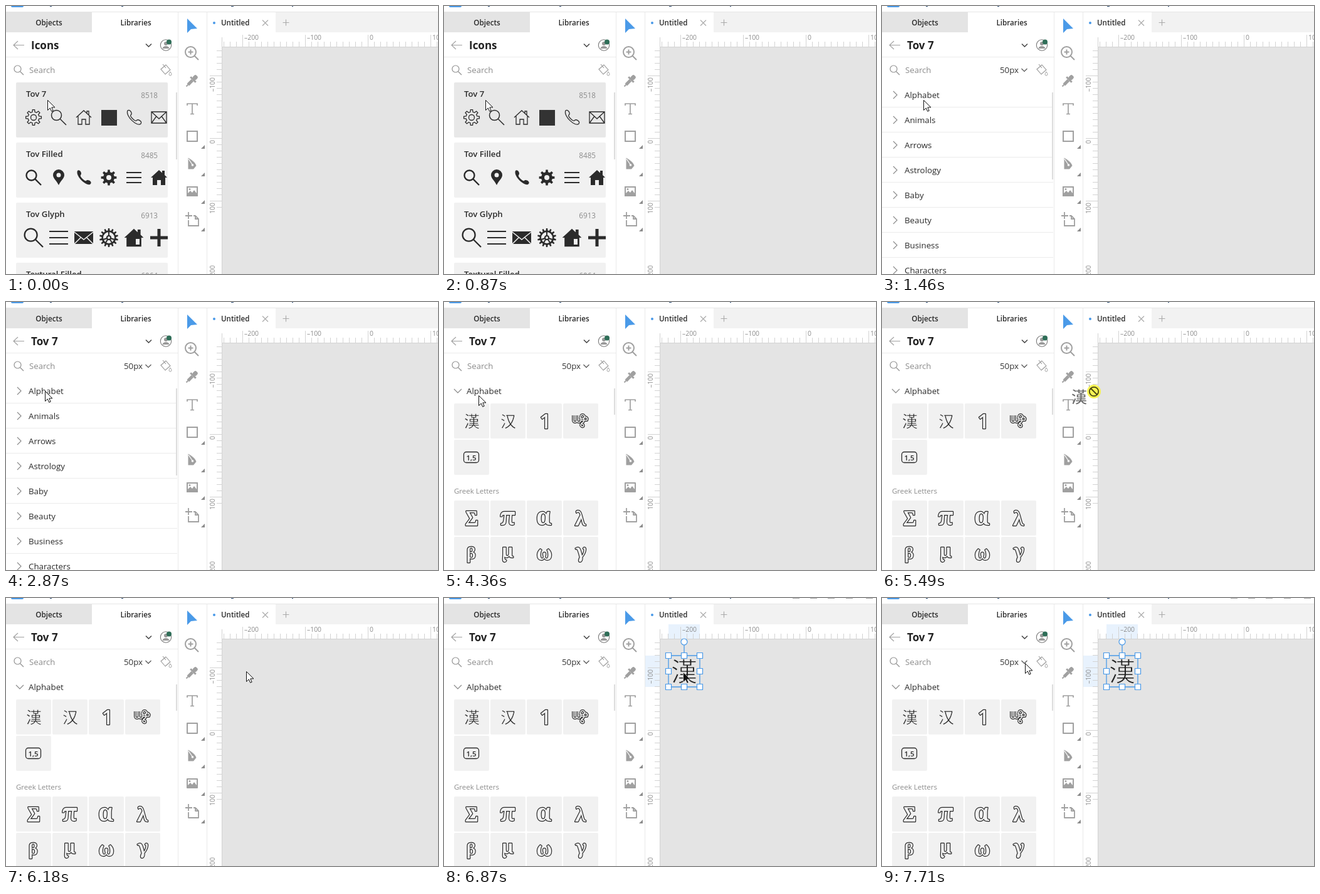
Recreate the animation shown at these times as an HTML page with a canvas. Size 689 by 428 pixels, loop 7.99 s.

```html
<!DOCTYPE html>
<html lang="en">
<head>
<meta charset="utf-8">
<title>Icon library drag and drop</title>
<style>
html, body { margin: 0; width: 100%; height: 100%; overflow: hidden; background: #fff; }
canvas { display: block; width: 689px; height: 428px; }
</style>
</head>
<body>
<canvas id="stage" width="689" height="428"></canvas>
<script>
const ctx = document.getElementById('stage').getContext('2d');
const LOOP = 7990;
const INK = '#2b2b2b', GREY = '#8c8c8c', TOOL = '#a0a0a0', BLUE = '#4a9ae8';
const TILE = '#f1f1f1', BOARD = '#e4e4e4';
const SANS = '"Open Sans", "Noto Sans", sans-serif';
const SERIF = '"Noto Serif", "DejaVu Serif", serif';
const CJK = '"Noto Sans CJK SC", "Noto Sans CJK JP", "Noto Sans CJK", sans-serif';

// Times of the hard changes
const T = { press: 640, full: 720, release: 870, open: 1460, press2: 2320, release2: 2500,
  expand: 3940, icons: 4120, grab: 4930, drop: 6180, place: 6410 };

// Pointer path: time, x, y
const PATH = [
  [0, 66, 150], [1885, 66, 150], [2130, 63, 143], [2845, 63, 143], [2870, 62, 142],
  [4230, 62, 142], [4360, 55, 149], [4560, 44, 168], [4750, 39, 188], [4890, 39, 188],
  [5000, 55, 206], [5100, 85, 218], [5200, 130, 206], [5290, 185, 185], [5370, 250, 163],
  [5450, 310, 149], [5490, 338, 143], [5600, 372, 122], [5720, 383, 117], [6830, 383, 117],
  [6870, 381, 118], [7030, 345, 126], [7250, 240, 132], [7380, 198, 122], [7500, 215, 109],
  [7580, 229, 105], [7685, 229, 105], [7710, 228, 104], [7990, 228, 104]
];

function slope(i, k) {
  return (PATH[i + 1][k] - PATH[i][k]) / (PATH[i + 1][0] - PATH[i][0]);
}

// Monotone tangent, so holds stay still
function tangent(i, k) {
  if (i === 0 || i === PATH.length - 1) return 0;
  const a = slope(i - 1, k), b = slope(i, k);
  return a * b <= 0 ? 0 : 2 * a * b / (a + b);
}

function pointer(t) {
  let i = 0;
  while (i < PATH.length - 2 && t >= PATH[i + 1][0]) i++;
  const h = PATH[i + 1][0] - PATH[i][0], u = (t - PATH[i][0]) / h;
  const at = k => {
    const p = PATH[i][k], q = PATH[i + 1][k];
    return Math.round(p + (q - p) * u * u * (3 - 2 * u)
      + h * u * (1 - u) * ((1 - u) * tangent(i, k) - u * tangent(i + 1, k)));
  };
  return [at(1), at(2)];
}

function rect(x, y, w, h, color, r = 0) {
  ctx.fillStyle = color;
  ctx.beginPath();
  ctx.roundRect(x, y, w, h, r);
  ctx.fill();
}

function text(s, x, y, size, color = INK, weight = 400, align = 'left') {
  ctx.font = `${weight} ${size}px ${SANS}`;
  ctx.textAlign = align;
  ctx.fillStyle = color;
  ctx.fillText(s, x, y);
}

function at(x, y, draw, scale = 1) {
  ctx.save();
  ctx.translate(x, y);
  ctx.scale(scale, scale);
  draw();
  ctx.restore();
}

function stroke(d, x, y, color = INK, width = 1.3, scale = 1) {
  at(x, y, () => {
    ctx.strokeStyle = color;
    ctx.lineWidth = width / scale;
    ctx.stroke(new Path2D(d));
  }, scale);
}

function fill(d, x, y, color = INK, scale = 1) {
  at(x, y, () => {
    ctx.fillStyle = color;
    ctx.fill(new Path2D(d), 'evenodd');
  }, scale);
}

const ring = (r, cx = 0, cy = 0) =>
  `M${cx + r} ${cy}A${r} ${r} 0 1 0 ${cx - r} ${cy}A${r} ${r} 0 1 0 ${cx + r} ${cy}Z`;

function gear(n, inner, outer) {
  let d = '';
  for (let i = 0; i < n; i++) {
    [[-.29, inner], [-.17, outer], [.17, outer], [.29, inner]].forEach(([o, r]) => {
      const a = (i + o) * 2 * Math.PI / n;
      d += `${d ? 'L' : 'M'}${(r * Math.sin(a)).toFixed(2)} ${(-r * Math.cos(a)).toFixed(2)}`;
    });
  }
  return d + 'Z';
}

const D = {
  lens: ring(8, -3.5, -3.5) + 'M2.2 2.2L12 12',
  home: 'M-12 0L0-11L12 0M-9-2V11H-3V3H3V11H9V-2M5-7V-10H8V-4',
  house: 'M0-12L5-7.5V-11H9V-4L13 0H10V12H-10V0H-13Z',
  phone: 'M-10-11C-6-14-2-6-5-4C-7-2 2 7 4 5C6 2 14 6 11 10C6 16-14-2-10-11Z',
  mail: 'M-12-9H12V9H-12ZM-12-9L0 2L12-9M-12 9L-4-2M12 9L4-2',
  pin: 'M0 12C-4 4-9 1-9-4A9 9 0 0 1 9-4C9 1 4 4 0 12Z' + ring(3.5, 0, -4),
  lines: 'M-12-8H12M-12 0H12M-12 8H12',
  script: 'M-11-8V0C-11 4-5 4-5 0V-8M-5 0C-5 4 1 4 1 0V-6C1-10 7-10 7-6S1-1 0-5' +
    'M1 0H11C13-4 9-7 6-4V2C2 4-1 8 3 10S6 4 2 6',
  down: 'M-4.5-2L0 2.5L4.5-2',
  right: 'M-3-6L3 0L-3 6',
  arrow: 'M.5.5V16.5L4.3 12.9L6.7 18.3L9.2 17.2L6.8 11.9H12Z'
};

function titleBar(selected) {
  rect(8, 0, 20, 2, BLUE, [0, 0, 3, 3]);
  [[70, 3], [184, 3], [359, 4], [456, 2]].forEach(([x, w]) => rect(x, 0, w, 1, '#2b4a70'));
  if (selected) [556, 584, 612, 641, 673].forEach(x => rect(x, 0, 11, 1, '#a5a5a5'));
}

function header(t) {
  rect(0, 10, 137, 32, BOARD);
  text('Objects', 68.5, 31, 11.7, INK, 600, 'center');
  text('Libraries', 207, 31, 11.7, INK, 600, 'center');
  stroke('M17 0H0M7-6.5L0 0L7 6.5', 12, 62.5, '#a0a0a0', 1.1);
  text(t < T.open ? 'Icons' : 'Tov 7', 40, 69, 17, '#222', 700);
  stroke(D.down, 227.5, 62.5, '#444', 1.5);
  stroke(ring(8.7), 255, 62.5, '#777', 1.1);
  fill(ring(3, 0, -2.5) + 'M-5.5 5.5C-5 0 5 0 5.5 5.5Z', 255, 62.5, '#999');
  fill(ring(4), 260, 57.5, '#2f6e58');
  rect(0, 81, 274, 1, '#ececec');
  stroke(ring(5.5, -1.5, -1.5) + 'M2.5 2.5L8 8', 20, 102, '#909090', 1.2);
  text('Search', 37, 107, 13.2, GREY);
  if (t >= T.open) {
    text('50px', 188, 107, 13.3, '#333');
    stroke(D.down, 227, 102, '#555', 1.2);
  }
  stroke('M-7 0L1-7L8 1L0 8ZM-4-8L1-2', 254, 101, '#999', 1.1);
  stroke('M0-3C-3 1-2 3 0 3S3 1 0-3Z', 262, 108, '#999', 1);
  rect(274, 10, 1, 418, '#e9e9e9');
}

function mailFilled(x, y) {
  rect(x - 15, y - 10, 30, 20, INK);
  stroke('M-15-9L0 3L15-9M-15 10L-5 0M15 10L5 0', x, y, TILE, 1.5);
}

function libraryList() {
  ctx.save();
  ctx.beginPath();
  ctx.rect(16, 122, 242, 306);
  ctx.clip();
  [['Tov 7', 8518], ['Tov Filled', 8485], ['Tov Glyph', 6913], ['Textural Filled', 6064]].forEach(([name, count], i) => {
    const y = 122 + 96 * i;
    rect(16, y, 242, 88, i ? TILE : '#e8e8e8', 2);
    text(name, 32, y + 23, 13.2, INK, 600);
    text(count, 242, y + 25, 11.7, GREY, 400, 'right');
  });
  stroke(gear(8, 9, 12.5) + ring(4.5), 44, 178);
  stroke(D.lens, 84, 178, INK, 1.5);
  stroke(D.home, 124, 178);
  rect(152, 166, 25, 25, '#333');
  stroke(D.phone, 204, 178);
  stroke(D.mail, 244, 178);

  stroke(D.lens, 44, 274, INK, 2.4);
  fill(D.pin, 84, 274);
  fill(D.phone, 124, 274);
  fill(gear(8, 9, 12.5) + ring(4), 164, 274);
  stroke(D.lines, 204, 274, INK, 2);
  fill(D.house, 244, 274);
  rect(241, 278, 6, 8, TILE);

  stroke(D.lens, 44, 370, INK, 2.3, 1.25);
  stroke(D.lines, 84, 370, INK, 2, 1.25);
  mailFilled(124, 370);
  fill(gear(14, 11.5, 15) + ring(9), 164, 370);
  stroke(ring(3) + 'M0-9V-3M-9 3L-3 1M9 3L3 1M-5 8L-2 3M5 8L2 3', 164, 370, INK, 2);
  fill(D.house, 204, 370, INK, 1.18);
  rect(207, 372, 6, 9, TILE);
  stroke('M-14 0H14M0-14V14', 244, 370, INK, 5);
  ctx.restore();
  rect(271, 138, 2, 107, '#dcdcdc');
}

function categories() {
  ['Alphabet', 'Animals', 'Arrows', 'Astrology', 'Baby', 'Beauty', 'Business', 'Characters'].forEach((name, i) => {
    const y = 142 + 40 * i;
    stroke(D.right, 21, y, GREY, 1.2);
    text(name, 36, y + 5, 13.3);
    rect(0, y + 19, 273, 1, '#ebebeb');
  });
  rect(271, 138, 2, 139, '#dcdcdc');
}

// A backdrop colour trims the strokes to a lighter weight
function glyph(s, x, y, size, backdrop) {
  ctx.font = `300 ${size}px ${CJK}`;
  ctx.textAlign = 'center';
  ctx.fillStyle = '#222';
  ctx.fillText(s, x, y + size * .38);
  if (!backdrop) return;
  ctx.strokeStyle = backdrop;
  ctx.lineWidth = size * .024;
  ctx.strokeText(s, x, y + size * .38);
}

// Outlined letter, centred and sized to a square icon box
function hollow(s, x, y, family) {
  const box = 23.5, font = size => `600 ${size}px ${family}`;
  const measure = () => {
    const m = ctx.measureText(s);
    return { l: m.actualBoundingBoxLeft, r: m.actualBoundingBoxRight,
      a: m.actualBoundingBoxAscent, d: m.actualBoundingBoxDescent };
  };
  ctx.textAlign = 'left';
  ctx.font = font(40);
  let m = measure();
  ctx.font = font(40 * box / Math.max(m.l + m.r, m.a + m.d));
  m = measure();
  const left = x + (m.l - m.r) / 2, base = y + (m.a - m.d) / 2;
  ctx.lineJoin = 'round';
  ctx.strokeStyle = INK;
  ctx.lineWidth = 2.4;
  ctx.strokeText(s, left, base);
  ctx.fillStyle = TILE;
  ctx.fillText(s, left, base);
}

function alphabet(t) {
  stroke('M-6-3L0 3L6-3', 22, 142, GREY, 1.2);
  text('Alphabet', 36, 147, 13.3);
  text('Greek Letters', 16, 306, 11.5, GREY);
  [162, 220, 317, 375].forEach((y, row) => {
    for (let col = 0; col < (row === 1 ? 1 : 4); col++) rect(16 + 58 * col, y, 56, 56, TILE, 2);
  });
  rect(271, 138, 2, 42, '#dcdcdc');
  if (t < T.icons) return;
  glyph('漢', 44.5, 190, 25, TILE);
  glyph('汉', 102.5, 190, 25, TILE);
  hollow('1', 160, 190, SANS);
  stroke(D.script, 217, 189, INK, 4);
  stroke(D.script, 217, 189, TILE, 1.6);
  ctx.strokeStyle = INK;
  ctx.lineWidth = 1.3;
  ctx.beginPath();
  ctx.roundRect(31.5, 239.5, 24, 17, 4);
  ctx.stroke();
  text('1,5', 43.5, 252.5, 11.5, INK, 600, 'center');
  [...'Σπαλβμωγ'].forEach((s, i) => hollow(s, 44 + 58 * (i % 4), i < 4 ? 345 : 403, SERIF));
}

function toolbar() {
  rect(320, 10, 1, 418, '#e9e9e9');
  fill('M0 0V23L6 17L16 16Z', 289, 20, BLUE);
  stroke(ring(8.5, -1.5, -1.5) + 'M5 5L11 11M-5.5-1.5H2.5M-1.5-5.5V2.5', 296, 75, TOOL, 2);
  at(296, 120, () => {
    ctx.rotate(Math.PI / 4);
    rect(-3.5, -12, 7, 8, TOOL, 3);
    rect(-6, -5, 12, 3, TOOL);
    rect(-2.5, -2, 5, 10, TOOL);
    rect(-1, 8, 2, 4, TOOL);
  });
  stroke('M-8-5V-8H8V-5M0-8V8.5M-3 8.5H3', 297, 164, TOOL, 1.7);
  stroke('M-8-8H8V8H-8Z', 297, 208, TOOL, 2);
  fill('M-6.5-9.5C0-6 5-2 6.5 3L2 8.5H-6.5Z', 297, 252, TOOL);
  stroke('M-6-8L0 1', 297, 252, '#fff', 1.2);
  fill(ring(1.8), 297.5, 254, '#fff');
  stroke('M-8-7H8V7H-8Z', 297, 296, TOOL, 2);
  fill('M-7 6V3L-3-1L0 2L3-2L7 3V6Z' + ring(1.5, -4, -3.5), 297, 296, TOOL);
  stroke('M-11-6H0M-6-12V-1M-6 1V10H10V-1L5-6H2M5-6V-1H10', 297, 341, TOOL, 1.8);
  [228, 272, 316, 360].forEach(y => fill('M0 0V-6L-6 0Z', 317, y, GREY));
}

function workspace(selected) {
  rect(321, 10, 368, 32, '#f2f2f2');
  rect(321, 10, 109, 32, '#fff');
  fill(ring(2), 332, 27, BLUE);
  text('Untitled', 343, 31, 11.6, INK, 600);
  stroke('M-4.5-4.5L4.5 4.5M4.5-4.5L-4.5 4.5', 413.5, 27, '#aaa', 1.1);
  stroke('M-5 0H5M0-5V5', 446.5, 26.5, '#aaa', 1.1);
  rect(345, 66, 344, 362, BOARD);
  if (selected) {
    rect(358, 42, 50, 24, '#e8f2fd');
    rect(321, 92, 24, 50, '#e8f2fd');
  }
  const tick = '#d3d3d3';
  rect(345, 65, 344, 1, tick);
  rect(344, 50, 1, 378, tick);
  for (let v = -230; v <= 110; v += 10) {
    const major = v % 100 === 0;
    const x = 577 + v, y = 211 + v;
    if (x > 346) rect(x, major ? 46 : 57, 1, major ? 20 : 9, tick);
    if (y > 66) rect(major ? 325 : 336, y, major ? 20 : 9, 1, tick);
  }
  [-200, -100, 0, 100, 200].forEach(v => {
    const label = (v < 0 ? '–' : '') + Math.abs(v);
    text(label, 580 + v, 54, 10.4, GREY);
    if (v > -200) at(333, 214 + v, () => {
      ctx.rotate(-Math.PI / 2);
      text(label, 0, 0, 10.4, GREY, 400, 'right');
    });
  });
}

function selection() {
  glyph('漢', 383, 117, 42, BOARD);
  stroke('M0-22V0M-25 0H25V50H-25Z', 383, 92, BLUE, 1.3);
  const knob = d => (x, y) => { fill(d, x, y, '#fff'); stroke(d, x, y, BLUE, 1.2); };
  knob(ring(5))(383, 70);
  const square = knob('M-4.5-4.5H4.5V4.5H-4.5Z');
  for (const x of [358, 383, 408])
    for (const y of [92, 117, 142]) if (x !== 383 || y !== 117) square(x, y);
}

function arrow(x, y, dark) {
  fill(D.arrow, x, y, dark ? '#111' : '#fff');
  stroke(D.arrow, x, y, dark ? '#fff' : '#111', dark ? .6 : 1);
}

function cursor(t) {
  const [x, y] = pointer(t);
  const dragging = t >= T.grab + 70 && t < T.drop;
  if (dragging) {
    const [gx, gy] = pointer(t - 41);
    ctx.globalAlpha = .7;
    glyph('漢', gx + 4.5, gy + 2, 25);
    ctx.globalAlpha = 1;
  }
  const down = (t >= T.press && t < T.release) || (t >= T.press2 && t < T.release2) || (t >= T.grab && t < T.drop);
  if (down) fill(ring(t < T.full ? 8 : 11), x, y, 'rgba(248,244,60,.88)');
  if (dragging && x < 345) {
    stroke(ring(7.2) + 'M-5-5L5 5', x, y, '#4a4814', 1.8);
    return;
  }
  arrow(x, y, t >= T.place && x > 354);
  if (dragging) {
    rect(x + 9, y + 19, 12, 12, '#777');
    rect(x + 10, y + 20, 10, 10, '#fff');
    stroke('M-3 0H3M0-3V3', x + 15, y + 25, '#222', 1);
  }
}

function draw(t) {
  const selected = t >= T.place;
  rect(0, 0, 689, 428, '#fff');
  rect(0, 9, 689, 1, '#e6e6e6');
  titleBar(selected);
  header(t);
  if (t < T.open) libraryList();
  else if (t < T.expand) categories();
  else alphabet(t);
  toolbar();
  workspace(selected);
  if (selected) selection();
  cursor(t);
}

const start = performance.now();
function loop() {
  draw((performance.now() - start) % LOOP);
  requestAnimationFrame(loop);
}
loop();
</script>
</body>
</html>
```
